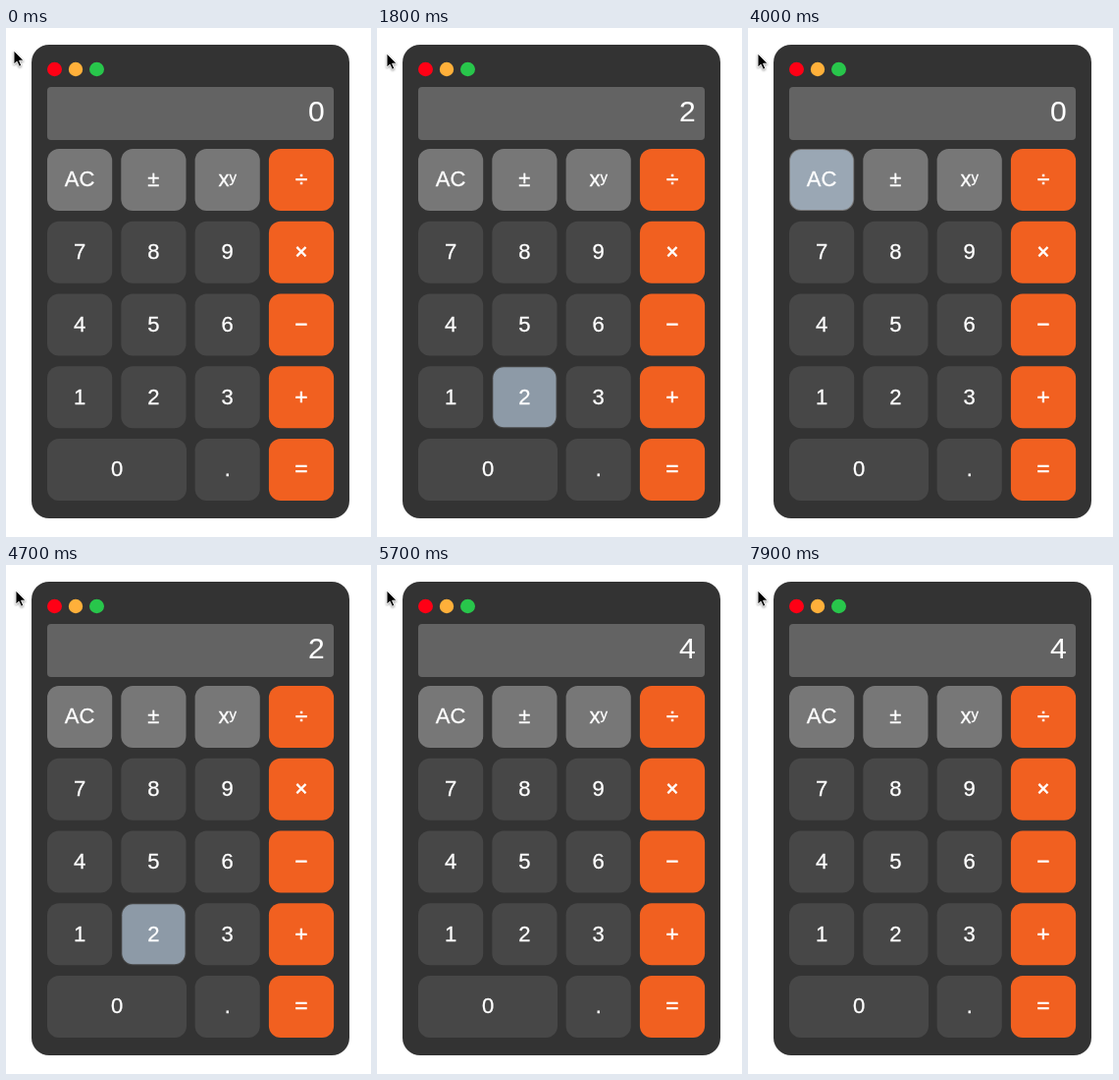
Animation, 372 px wide and 518 px high, one loop 8000 ms. Source, as an HTML page:

```html
<!DOCTYPE html>
<html lang="en">
<head>
<meta charset="utf-8">
<title>Calculator</title>
<style>
html, body { margin: 0; width: 100%; height: 100%; overflow: hidden; background: #fff; }
svg { display: block; }
text {
  font: 22px "Liberation Sans", Arial, sans-serif;
  fill: #fff; stroke: #fff; stroke-width: .3px; text-anchor: middle;
}
text.op { stroke-width: .7px; }
#value { font-size: 30px; text-anchor: end; stroke-width: .1px; }
#cursor { filter: drop-shadow(0 1px 1px #0006); }
</style>
</head>
<body>
<svg width="372" height="518" viewBox="0 0 372 518">
  <rect x="26" y="17" width="324" height="482" rx="18" fill="#333"/>
  <ellipse cx="49.5" cy="42" rx="7.5" ry="7.2" fill="#ff0015"/>
  <ellipse cx="71" cy="42" rx="7.2" ry="7.2" fill="#ffb03a"/>
  <ellipse cx="92.5" cy="42" rx="7.5" ry="7.2" fill="#28c64b"/>
  <rect x="42" y="60" width="292" height="54" rx="4" fill="#636363"/>
  <text id="value" x="324.8" y="94.6">0</text>
  <g id="keys"></g>
  <path id="cursor" d="M0 0V14L3.2 11.2L5.4 16.2L7.8 15.2L5.6 10.2H10Z" fill="#000" stroke="#fff" stroke-width=".9"/>
</svg>
<script>
const LOOP = 8000, STEP = 100;
const rows = [["AC", "±", "xy", "÷"], [..."789×"], [..."456−"], [..."123+"], ["0", "", ".", "="]];
const presses = [[1800, "2"], [4000, "AC"], [4700, "2"], [5300, "+"], [5500, "="]];
const values = [[0, "0"], [1800, "2"], [4000, "0"], [4700, "2"], [5500, "4"]];
const places = [[0, [8, 23]], [100, [10, 25]], [1000, [10, 26]]];
const fade = [.73, .3]; // highlight strength per step after a press
const glow = {};

const byId = id => document.getElementById(id);
const value = byId("value"), cursor = byId("cursor"), keys = byId("keys");

function add(tag, attrs, content = "") {
  const el = document.createElementNS("http://www.w3.org/2000/svg", tag);
  for (const name in attrs) el.setAttribute(name, attrs[name]);
  el.innerHTML = content;
  return keys.appendChild(el);
}

rows.forEach((row, r) => row.forEach((label, c) => {
  if (!label) return;
  const x = 42 + c * 75.3, y = 123 + r * 73.75;
  const width = label === "0" ? 142 : 66.2, height = 63;
  const fill = c === 3 ? "#f16020" : r ? "#474747" : "#777";
  add("rect", { x, y, width, height, rx: 12, fill });
  glow[label] = add("rect", {
    x: x + 1, y: y + 1, width: width - 2, height: height - 2, rx: 11, fill: "#a8bacb", opacity: 0
  });
  const content = label === "xy" ? 'x<tspan dy="-4.3" font-size="15" style="font-size:15px">y</tspan>' : label;
  add("text", { x: x + width / 2, y: y + 38.4, class: c === 3 ? "op" : "" }, content);
}));

const latest = (list, t) => list.filter(([start]) => start <= t).pop()[1];

function draw(now) {
  const t = Math.floor(now % LOOP / STEP) * STEP;
  value.textContent = latest(values, t);
  cursor.setAttribute("transform", `translate(${latest(places, t)})`);
  for (const label in glow) {
    const strength = presses
      .filter(([, key]) => key === label)
      .reduce((sum, [start]) => sum + (fade[(t - start) / STEP] || 0), 0);
    glow[label].setAttribute("opacity", strength);
  }
}

const start = performance.now();
function tick() {
  draw(performance.now() - start);
  requestAnimationFrame(tick);
}
tick();
</script>
</body>
</html>
```
